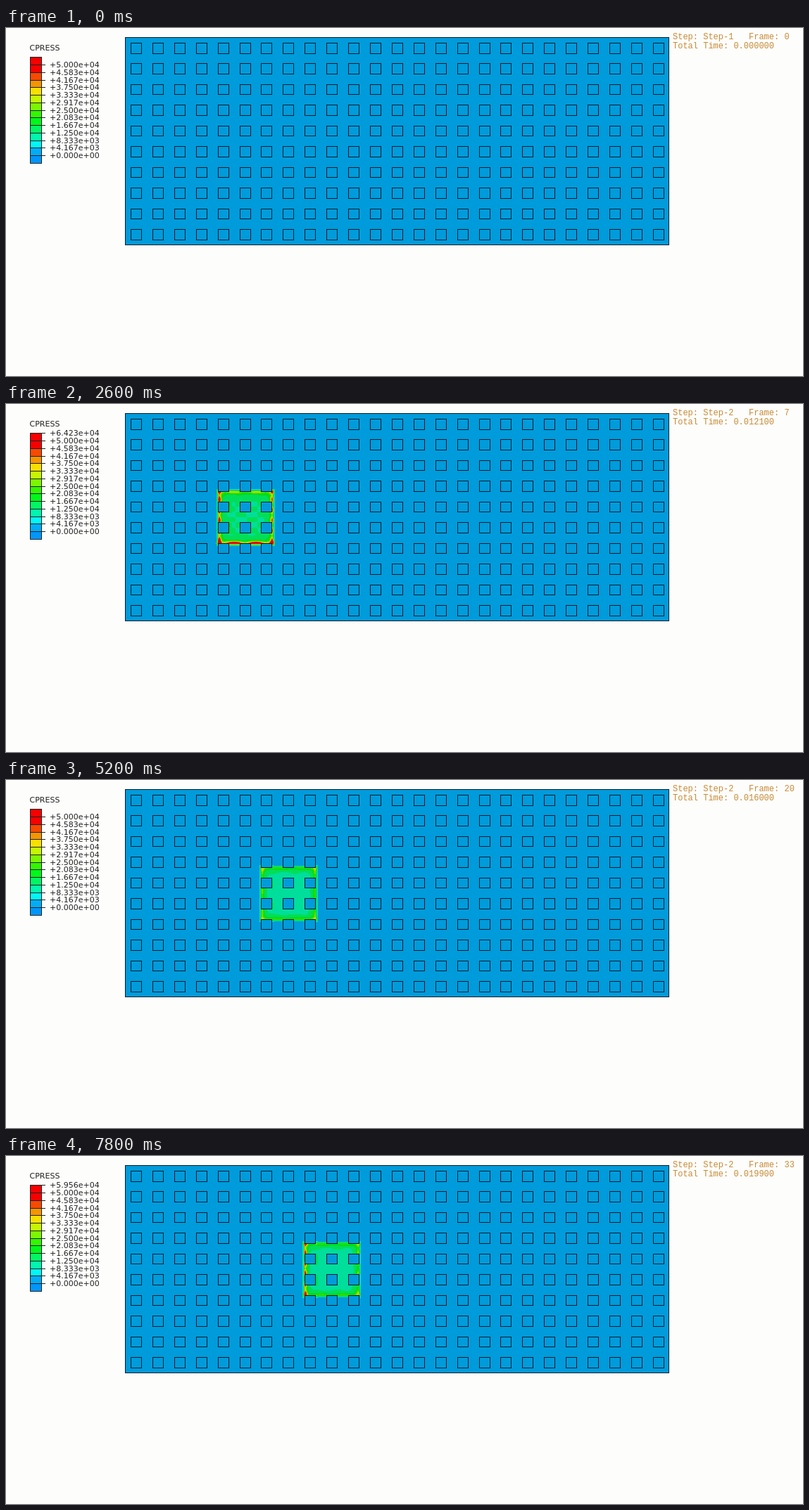
An HTML page with a canvas for the animation above (8000 ms loop, 1132x495 px).

```html
<!DOCTYPE html>
<html lang="en">
<head>
<meta charset="utf-8">
<style>
html, body { margin: 0; width: 100%; height: 100%; overflow: hidden; background: #fdfdfc; }
canvas { display: block; }
</style>
</head>
<body>
<canvas id="stage" width="1132" height="495"></canvas>
<script>
const ctx = document.getElementById('stage').getContext('2d');
const STEP_MS = 200, STEPS = 40, RAMP_STEPS = 6, BANDS = 12;
const PLATE = '#009bdb', INK = '#00202e';
const COL_PITCH = 30.91, ROW_PITCH = 29.45;
const PATCH = { x: 268.8, y: 124, w: 76.5, h: 74, speed: 4.7 };

// Peak pressure in 1e4 at a few steps, linear in between
const PEAKS = [[0, 0], [6, 4.2], [13, 6.423], [20, 6.817], [26, 4.2], [30, 9.662], [39, 5.956]];

const bandColor = (band, lightness) => `hsl(${198 - 18 * band} 100% ${lightness}%)`;
const clamp = v => Math.max(0, Math.min(1, v));
const bell = (d, width) => Math.exp(-((d / width) ** 2));
const holeX = col => Math.round(177 + COL_PITCH * col);
const holeY = row => Math.round(20.9 + ROW_PITCH * row);

function peakAt(step) {
  const i = Math.max(1, PEAKS.findIndex(([s]) => s >= step));
  const [s0, p0] = PEAKS[i - 1], [s1, p1] = PEAKS[i];
  return p0 + (p1 - p0) * (step - s0) / (s1 - s0);
}

// Edge loads grow with the overload; the later surge hits the trailing edge only
function loadAt(step) {
  const ramp = clamp(step / RAMP_STEPS);
  const over = Math.min(2.8, Math.max(0, peakAt(step) - 4.2));
  const shock = step < 26 ? over : 0;
  return {
    base: ramp * (1.07 + 0.08 * shock),
    left: ramp * (1 + 0.85 * over),
    right: ramp * (0.85 + 0.45 * shock),
    top: ramp * (0.6 + 0.2 * shock),
    bottom: ramp * (0.65 + shock),
    rough: 0.15 + 0.15 * over
  };
}

function drawPatch(step) {
  const { base, left, right, top, bottom, rough } = loadAt(step);
  const x0 = PATCH.x + PATCH.speed * Math.max(0, step - RAMP_STEPS);
  const pad = 4;
  const edge = (d, strength) => strength * bell(d - 0.5, 2.6) + 0.4 * base * bell(d, 8);

  for (let y = PATCH.y - pad; y <= PATCH.y + PATCH.h + pad; y++) {
    for (let x = Math.floor(x0 - pad); x <= x0 + PATCH.w + pad; x++) {
      const u = x - x0, v = y - PATCH.y;
      const r = PATCH.w - u, b = PATCH.h - v;
      const fade = clamp((Math.min(u, r, v, b) + pad) / pad);
      const ripple = 0.06 * base * Math.sin(v * 0.42 + step) * Math.cos(u * 0.2);
      const alongY = 1 + rough * Math.sin(v * 0.43 + step * 0.7);
      const alongX = 1 + rough * Math.cos((x - 200) / COL_PITCH * 2 * Math.PI);
      const corner = bell(Math.min(u, r), 4) * bell(Math.min(v, b), 4);

      // Where a hole covers the trailing edge, its far side carries the load
      const rim = x - holeX(Math.floor((x - 177) / COL_PITCH)) - 15;
      const besideHole = (y - 20.9) % ROW_PITCH < 16 && rim >= 0 && u > 5 && u < 22;

      const p = fade * (base + ripple + 0.3 * base * corner +
        edge(u, left * alongY) + edge(r, right * alongY) +
        edge(v, top * alongX) + edge(b, bottom * alongX) +
        (besideHole ? 0.35 * left * bell(rim, 2.5) : 0));
      if (p < 0.25) continue;
      ctx.fillStyle = bandColor(Math.min(BANDS - 1, Math.floor(p / 5 * BANDS)), 43.5);
      ctx.fillRect(x, y, 1, 1);
    }
  }
}

function box(x, y, w, h) {
  ctx.fillRect(x, y, w, h);
  ctx.strokeRect(x + 0.5, y + 0.5, w, h);
}

function drawHoles() {
  ctx.fillStyle = PLATE;
  for (let row = 0; row < 10; row++)
    for (let col = 0; col < 25; col++)
      box(holeX(col), holeY(row), 15, Math.round(35.5 + ROW_PITCH * row) - holeY(row));
}

function drawLegend(peak) {
  const edgeY = i => 41.3 + i * 10.75;
  const label = (value, y) => {
    const [digits, power] = value.toExponential(3).split('e');
    ctx.fillText(`+${digits}e+0${power.slice(1)}`, 62, y + 4);
    ctx.fillRect(50, Math.round(y), 6, 1);
  };
  ctx.font = '11px "DejaVu Sans", sans-serif';
  ctx.strokeStyle = '#222';
  for (let i = 0; i < BANDS + 2; i++) {
    const y = Math.round(edgeY(i));
    ctx.fillStyle = i > BANDS ? '#0096fa' : bandColor(Math.min(BANDS - 1, BANDS - i), 48.5);
    box(34, y, 16, Math.round(edgeY(i + 1)) - y);
  }
  ctx.fillStyle = '#222';
  ctx.fillText('CPRESS', 33.5, 32);
  if (peak > 5) label(peak * 1e4, edgeY(0));
  for (let i = 0; i <= BANDS; i++) label(5e4 * (1 - i / BANDS), edgeY(i + 1));
}

function drawHeader(step) {
  const moving = step >= RAMP_STEPS;
  const frame = moving ? step - RAMP_STEPS : step;
  const time = moving ? 0.01 + frame * 0.0003 : frame * 0.002;
  ctx.font = '12px "Liberation Mono", monospace';
  ctx.fillStyle = '#c98a35';
  ctx.fillText(`Step: Step-${moving ? 2 : 1}   Frame: ${frame}`, 947, 16);
  ctx.fillText(`Total Time: ${time.toFixed(6)}`, 947, 29);
}

function draw(step) {
  ctx.fillStyle = '#fdfdfc';
  ctx.fillRect(0, 0, 1132, 495);
  ctx.strokeStyle = INK;
  ctx.fillStyle = PLATE;
  box(169, 13, 772, 295);
  if (step > 0) drawPatch(step);
  drawHoles();
  drawLegend(peakAt(step));
  drawHeader(step);
}

const start = performance.now();
let shown = -1;
function tick() {
  const step = Math.floor((performance.now() - start) / STEP_MS) % STEPS;
  if (step !== shown) draw(shown = step);
  requestAnimationFrame(tick);
}
tick();
</script>
</body>
</html>
```
